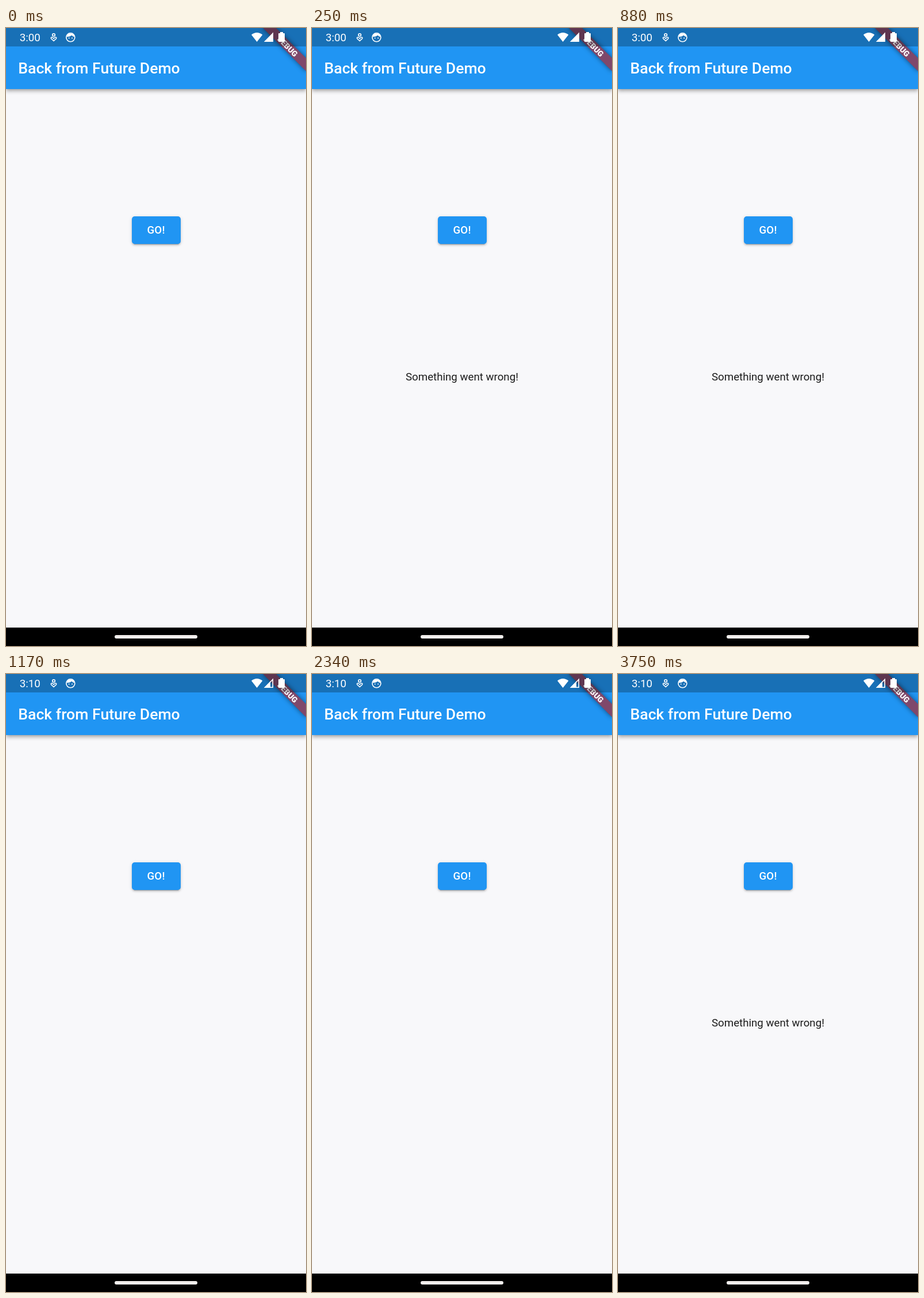
Animation, 522 px wide and 1073 px high, one loop 3790 ms. Source, as an HTML page:

```html
<!DOCTYPE html>
<html lang="en">
<head>
<meta charset="utf-8">
<title>Demo</title>
<style>
  html, body { margin: 0; width: 100%; height: 100%; overflow: hidden; background: #f8f8fa; }
  #stage { position: relative; width: 522px; height: 1073px; overflow: hidden; background: #f8f8fa; }
  #stage > * { position: absolute; }
  .bar { left: 0; top: 0; width: 522px; height: 106px; background: #2095f3;
    box-shadow: 0 2.5px 5px -1px #0003, 0 5px 6px #00000024, 0 1px 10px #0000001a; }
  .button { left: 218.5px; top: 327px; width: 85px; height: 47.5px; border-radius: 5px; background: #2095f3;
    box-shadow: 0 4px 1px -3px #0003, 0 2.5px 3px #00000024, 0 1px 6px #0000001f; }
  .banner { left: 468.8px; top: 37.2px; width: 106.4px; height: 16px; background: #b71c1ca0;
    transform: rotate(45deg); transform-origin: 53.2px -37.2px; box-shadow: 0 0 8px #0000007f; }
  .shade { left: 0; top: 0; width: 522px; height: 32px; background: #00000040; }
  .nav { left: 0; top: 1041px; width: 522px; height: 32px; background: #000; }
  .pill { left: 189px; top: 1054px; width: 144px; height: 6px; border-radius: 3px; background: #f3efed; }
  svg { left: 0; top: 0; }
  text { font-family: Roboto, sans-serif; fill: #fff; }
  .medium { font-weight: 500; }
  .line { fill: none; stroke: #fff; stroke-width: 1.6; }
</style>
</head>
<body>
<div id="stage">
  <div class="bar"></div>
  <div class="button"></div>
  <div class="banner"></div>
  <svg width="522" height="1073">
    <text transform="translate(490 32) rotate(45)" y="4.9" text-anchor="middle" font-size="13.56" font-weight="900">DEBUG</text>
  </svg>
  <div class="shade"></div>
  <div class="nav"></div>
  <div class="pill"></div>
  <svg width="522" height="1073" fill="#fff">
    <g font-size="18.7">
      <text id="early" x="23.8" y="23">3:00</text>
      <text id="late" x="23.8" y="23">3:10</text>
      <text class="medium" x="261" y="357" text-anchor="middle" letter-spacing=".2">GO!</text>
      <text id="error" x="261" y="612" text-anchor="middle" style="fill:#1c1c1c">Something went wrong!</text>
    </g>
    <text class="medium" x="21.2" y="79" font-size="26.6">Back from Future Demo</text>

    <g class="line">
      <circle cx="83" cy="12" r="2.3"/>
      <path d="M83 22.5L78.7 18.5Q77.6 16.4 79.6 16Q81.5 16 83 18.2Q84.5 16 86.4 16Q88.4 16.4 87.3 18.5Z"/>
      <circle cx="112.3" cy="16.3" r="7.5"/>
    </g>
    <path d="M105.5 15.5Q106 9.5 112.3 9.5Q118.6 9.5 119.1 15.5Q116 14.8 114.5 12.8Q111 15.3 105.5 15.5Z"/>
    <circle cx="109.6" cy="17.6" r="1"/>
    <circle cx="115" cy="17.6" r="1"/>

    <path d="M427 11.8Q436.5 4.3 446.3 11.8L436.6 24Z"/>
    <path id="full" d="M465 7.5V24H448.8Z"/>
    <g id="weak">
      <path d="M460 12.6V24H448.8Z"/>
      <path class="line" d="M464.2 9.5V23.2H451Z"/>
    </g>
    <path d="M477 7H482V9H484Q485 9 485 10V23Q485 24 484 24H475Q474 24 474 23V10Q474 9 475 9H477Z"/>
  </svg>
</div>
<script>
  const LOOP = 3790;

  // Each step is [time in ms, visible 0 or 1] and holds until the next one.
  function play(id, steps) {
    const frames = steps.map(([time, opacity]) => ({ offset: time / LOOP, opacity, easing: 'step-end' }));
    frames.push({ offset: 1, opacity: steps[steps.length - 1][1] });
    document.getElementById(id).animate(frames, { duration: LOOP, iterations: Infinity });
  }

  const RESTART = 1130;
  const before = [[0, 1], [RESTART, 0]];
  const after = [[0, 0], [RESTART, 1]];

  play('early', before);
  play('full', before);
  play('late', after);
  play('weak', after);
  play('error', [[0, 0], [130, 1], [RESTART, 0], [2960, 1]]);
</script>
</body>
</html>
```
